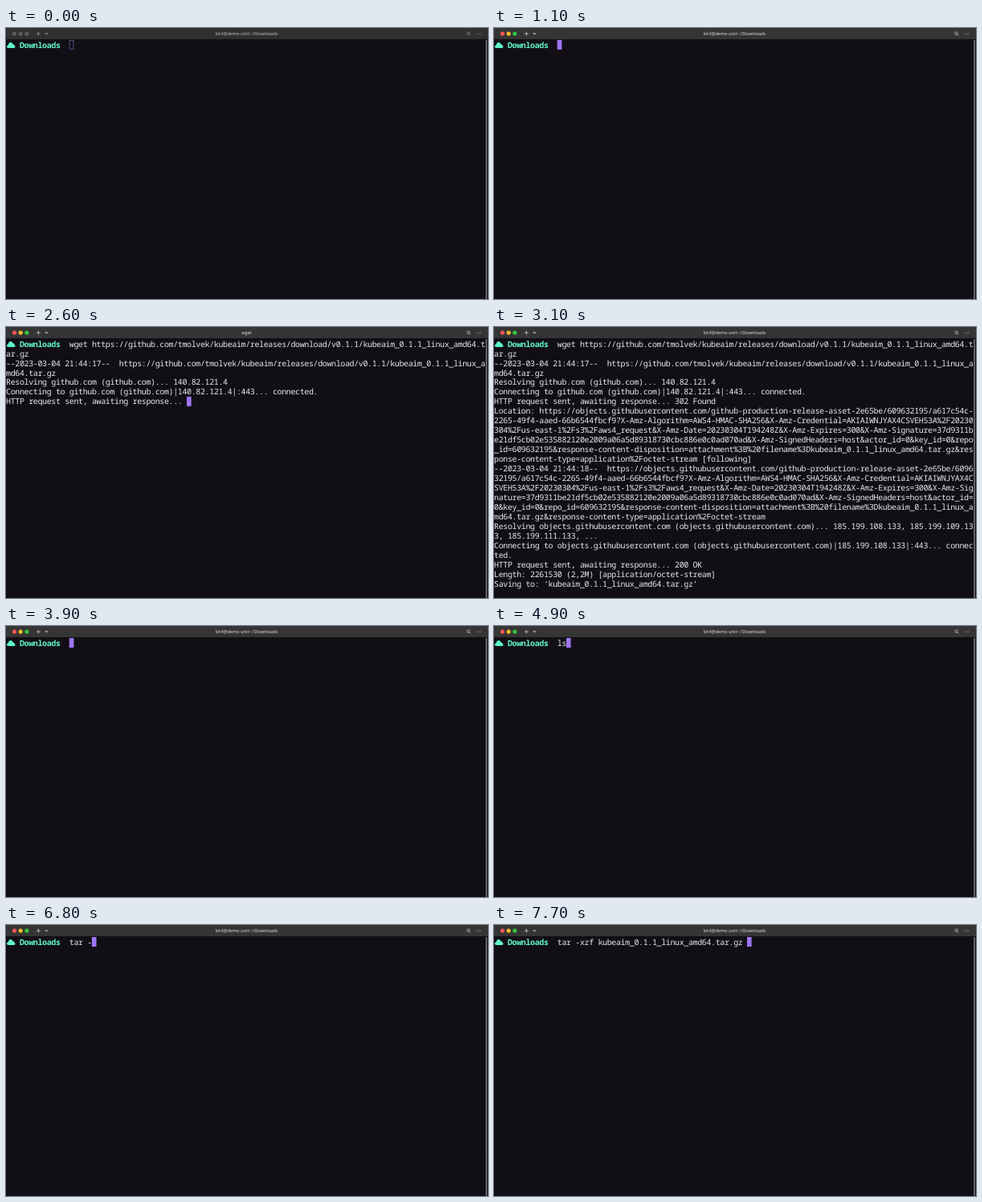
Recreate the animation shown at these times as an HTML page. Size 600 px wide and 338 px high, loop 8000 ms.

```html
<!DOCTYPE html>
<html lang="en">
<head>
<meta charset="utf-8">
<title>Terminal download</title>
<style>
  html, body { margin: 0; width: 100%; height: 100%; overflow: hidden; background: #110f15; }
  svg { display: block; width: 100vw; height: 100vh; }
  text { white-space: pre; text-rendering: geometricPrecision; }
  .mono { font: 10px "Noto Sans Mono", "DejaVu Sans Mono", monospace; letter-spacing: -0.375px; fill: #e9e8ea; }
  .dir { font-weight: 700; fill: #5ff8c5; }
  .title { font: 5.6px "Open Sans", "Noto Sans", sans-serif; text-anchor: middle; }
</style>
</head>
<body>
<svg viewBox="0 0 600 338">
  <defs>
    <g id="prompt">
      <path d="M3.2 25 C.4 25 .2 21.7 2.9 21.3 C3 17.6 7.4 17 8.2 20 C9.5 19.7 10 20.6 9.9 21.5 C12.2 21.8 12 25 9.8 25 Z" fill="#5ff8c5"/>
      <text class="mono dir" x="16.9" y="24.6">Downloads</text>
    </g>
  </defs>
  <rect width="600" height="338" fill="#110f15"/>
  <rect id="bar" width="600" height="14"/>
  <g id="lights">
    <circle cx="10.5" cy="7.1" r="2.6"/>
    <circle cx="18.2" cy="7.1" r="2.6"/>
    <circle cx="25.9" cy="7.1" r="2.6"/>
  </g>
  <g id="icons" fill="none" stroke-width=".7">
    <path d="M37.9 7.2h5M40.4 4.7v5"/>
    <path d="M48.9 6.7h3l-1.5 1.5z"/>
    <circle cx="575.5" cy="6.7" r="1.7"/>
    <path d="M576.8 8l1.5 1.5"/>
    <path d="M586 7.2h1M588 7.2h1M590 7.2h1"/>
  </g>
  <text id="title" class="title" x="299.5" y="9"/>
  <rect x="597.2" y="15" width="1.6" height="323" fill="#777679"/>
  <rect id="cursor" stroke-width=".8"/>
  <g id="rows"></g>
  <use id="first" href="#prompt"/>
  <use id="second" href="#prompt"/>
</svg>
<script>
const LOOP = 8000, TICK = 100;
const COLS = 106, ROWS = 27, CELL = 5.625, LINE = 11.97, TOP = 15;
const PROMPT_COLS = 14;
const $ = id => document.getElementById(id);

const archive = 'kubeaim_0.1.1_linux_amd64.tar.gz';
const release = 'https://github.com/tmolvek/kubeaim/releases/download/v0.1.1/' + archive;
const host = 'objects.githubusercontent.com';
const asset = `https://${host}/github-production-release-asset-2e65be/609632195/` +
  'a617c54c-2265-49f4-aaed-66b6544fbcf9?X-Amz-Algorithm=AWS4-HMAC-SHA256' +
  '&X-Amz-Credential=AKIAIWNJYAX4CSVEH53A%2F20230304%2Fus-east-1%2Fs3%2Faws4_request' +
  '&X-Amz-Date=20230304T194248Z&X-Amz-Expires=300&X-Amz-Signature=' +
  '37d9311be21df5cb02e535882120e2009a06a5d89318730cbc886e0c0ad070ad' +
  '&X-Amz-SignedHeaders=host&actor_id=0&key_id=0&repo_id=609632195' +
  `&response-content-disposition=attachment%3B%20filename%3D${archive}` +
  '&response-content-type=application%2Foctet-stream';
const waiting = 'HTTP request sent, awaiting response... ';

// '$' at the start of a line stands for the shell prompt.
const pasted = '$wget ' + release;
const resolving = `${pasted}\n--2023-03-04 21:44:17--  ${release}\nResolving github.com (github.com)... `;
const requested = resolving + '140.82.121.4\n' +
  'Connecting to github.com (github.com)|140.82.121.4|:443... connected.\n' + waiting;
const redirected = `${requested}302 Found\nLocation: ${asset} [following]\n` +
  `--2023-03-04 21:44:18--  ${asset}\nResolving ${host} (${host})... `;
const saving = redirected + '185.199.108.133, 185.199.109.133, 185.199.111.133, ...\n' +
  `Connecting to ${host} (${host})|185.199.108.133|:443... connected.\n${waiting}200 OK\n` +
  `Length: 2261530 (2,2M) [application/octet-stream]\nSaving to: ‘${archive}’\n\n\n`;

const steps = [
  [0, '$'],
  [1300, '$w'], [1400, '$wg'], [1500, '$wge'], [1700, '$wget'], [1800, '$wget '],
  [2300, pasted], [2400, resolving], [2500, requested], [2700, redirected], [2800, saving],
  [3900, '$'], [4500, '$l'], [4700, '$ls'], [5000, `$ls\n${archive}\n$`], [5500, '$'],
  [5800, '$t'], [5900, '$ta'], [6000, '$tar'], [6200, '$tar '], [6400, '$tar -'],
  [7100, '$tar -x'], [7200, '$tar -xz'], [7300, '$tar -xzf'], [7500, '$tar -xzf '],
  [7700, `$tar -xzf ${archive} `]
];

const rows = Array.from({ length: ROWS }, (_, i) => {
  const row = document.createElementNS('http://www.w3.org/2000/svg', 'text');
  row.setAttribute('class', 'mono');
  row.setAttribute('y', 24.6 + i * LINE);
  return $('rows').appendChild(row);
});

function set(el, attrs) {
  for (const key in attrs) el.setAttribute(key, attrs[key]);
}

function mix(a, b, k) {
  return `rgb(${a.map((v, i) => Math.round(v + (b[i] - v) * k))})`;
}

function wrap(text) {
  const out = [];
  for (const line of text.split('\n')) {
    const prompt = line[0] === '$';
    const full = prompt ? ' '.repeat(PROMPT_COLS) + line.slice(1) : line;
    for (let i = 0; i === 0 || i < full.length; i += COLS) {
      out.push({ text: full.slice(i, i + COLS), prompt: prompt && i === 0 });
    }
  }
  return out;
}

function drawBar(t) {
  const focus = Math.min(1, Math.max(0, (t - 700) / 300));
  const lit = [[252, 87, 80], [243, 183, 40], [56, 196, 62]];
  $('bar').setAttribute('fill', mix([48, 48, 48], [53, 53, 53], focus));
  [...$('lights').children].forEach((dot, i) =>
    dot.setAttribute('fill', mix([96, 91, 91], lit[i], focus)));
  $('icons').setAttribute('stroke', mix([155, 155, 155], [218, 218, 218], focus));
  $('title').setAttribute('fill', mix([200, 200, 200], [232, 232, 232], focus));
  $('title').textContent = t >= 2400 && t < 3100 ? 'wget' : 'kiril@demo-unit:~/Downloads';
}

function drawScreen(t) {
  const lines = wrap(steps.findLast(step => step[0] <= t)[1]);
  rows.forEach((row, i) => {
    const line = lines[i] ? lines[i].text : '';
    const start = line.length - line.trimStart().length;
    row.setAttribute('x', start * CELL);
    row.textContent = line.trim();
  });

  const prompts = lines.flatMap((line, i) => line.prompt ? [i] : []);
  [$('first'), $('second')].forEach((use, i) => set(use, {
    y: (prompts[i] || 0) * LINE,
    visibility: i < prompts.length ? 'visible' : 'hidden'
  }));

  const last = lines.length - 1;
  const hollow = t < 800, inset = hollow ? 0.4 : 0;
  set($('cursor'), {
    x: lines[last].text.length * CELL + inset,
    y: TOP + last * LINE + inset,
    width: CELL - inset * 2,
    height: LINE - inset * 2,
    fill: hollow ? 'none' : '#9f75f4',
    stroke: hollow ? '#6f55ac' : 'none'
  });
}

function frame(now) {
  const t = Math.floor((now % LOOP) / TICK) * TICK;
  drawBar(t);
  drawScreen(t);
}

let begin;
function loop(now) {
  begin ??= now;
  frame(now - begin);
  requestAnimationFrame(loop);
}
frame(0);
requestAnimationFrame(loop);
</script>
</body>
</html>
```
